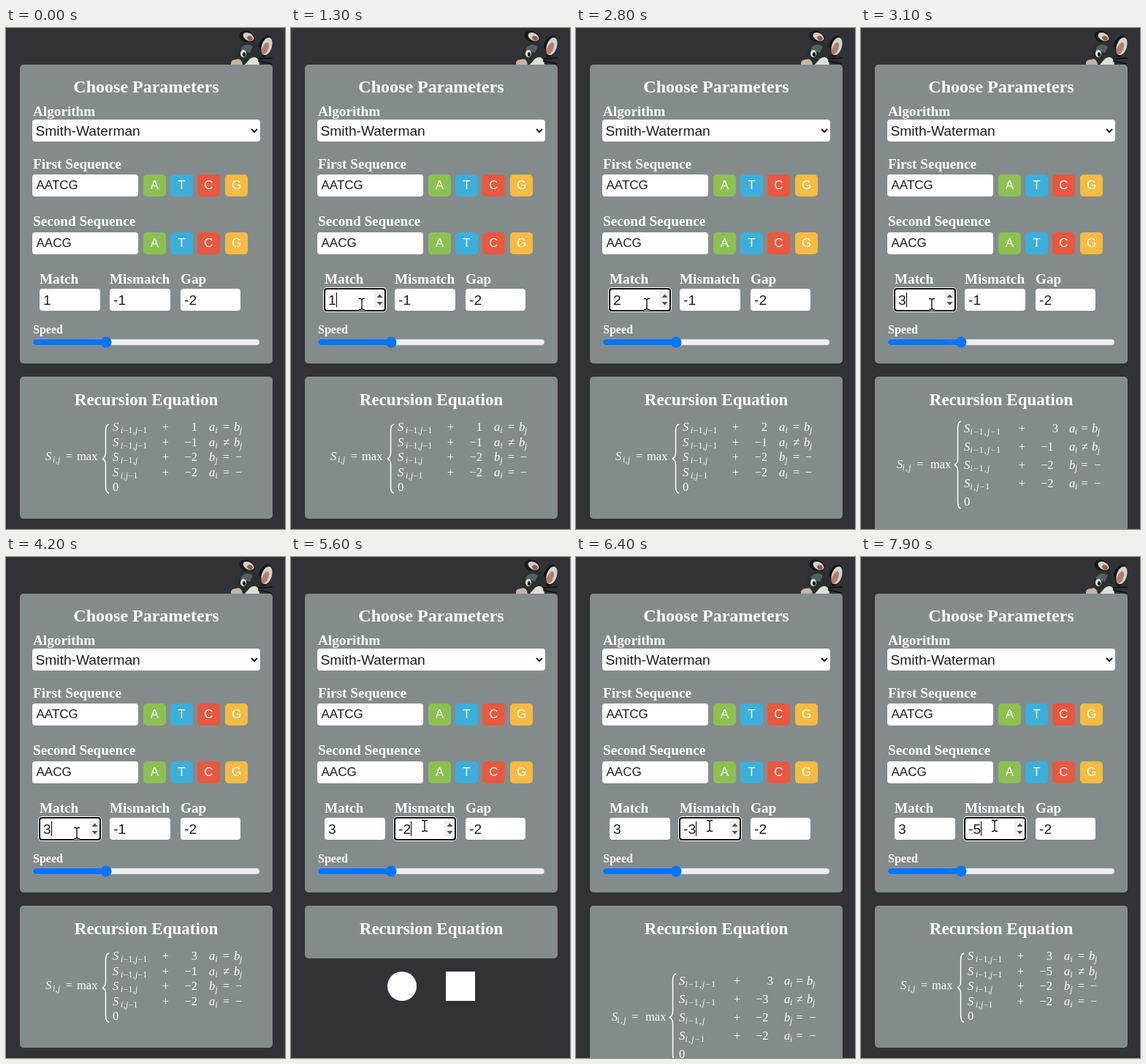
An HTML page that plays this animation: 382x684 px, repeating every 8000 ms.

```html
<!DOCTYPE html>
<html lang="en">
<head>
<meta charset="utf-8">
<title>Alignment parameters</title>
<style>
  html, body { margin: 0; width: 100%; height: 100%; overflow: hidden; background: #323136; }
  svg { display: block; width: 382px; height: 684px; }
  text { white-space: pre; }
  .label { font: bold 19.2px "Liberation Serif", serif; fill: #fff; }
  .title { font: bold 24px "Liberation Serif", serif; fill: #fff; text-anchor: middle; }
  .field { font: 19.2px "Liberation Sans", sans-serif; fill: #1c1c1c; }
  .seq { font-size: 17px; }
  .base { font: 17px "Liberation Sans", sans-serif; fill: #fff; text-anchor: middle; }
  .math { font: 16.5px "Liberation Serif", serif; fill: #fff; }
  .math .sub { font-size: 11.5px; }
  .math .mid { text-anchor: middle; }
  .math .end { text-anchor: end; }
  .math i, .it { font-style: italic; }
  .card { fill: #848b8d; }
  .box { fill: #fff; }
</style>
</head>
<body>
<svg viewBox="0 0 382 684">
  <g id="mouse">
    <ellipse cx="330" cy="12" rx="11" ry="8" fill="#17191a" transform="rotate(24 330 12)"/>
    <ellipse cx="332" cy="12" rx="8" ry="5" fill="#d8cfc6" transform="rotate(28 332 12)"/>
    <ellipse cx="334" cy="14" rx="4" ry="3" fill="#8f5d55" transform="rotate(28 334 14)"/>
    <ellipse cx="355" cy="25" rx="9" ry="15" fill="#111415" transform="rotate(18 355 25)"/>
    <ellipse cx="357" cy="25" rx="7" ry="12.5" fill="#cfd3cf" transform="rotate(18 357 25)"/>
    <ellipse cx="355" cy="28" rx="4" ry="9" fill="#b57a70" transform="rotate(24 355 28)"/>
    <path d="M316 36Q319 19 333 18Q346 20 350 35L347 50H316Z" fill="#29302f"/>
    <path d="M322 27Q329 19 338 25L334 34Q327 30 322 36Z" fill="#536061"/>
    <ellipse cx="325" cy="35" rx="4" ry="5" fill="#e3e6df"/>
    <ellipse cx="326" cy="36" rx="2" ry="3" fill="#080a0a"/>
    <path d="M334 42Q345 35 347 50H327Z" fill="#dce0d9"/>
    <path d="M308 50Q307 43 315 43Q322 40 324 50Z" fill="#c9b5a3"/>
    <path d="M345 42L365 41M345 45L364 49" stroke="#0c0e0e" stroke-width="1.5"/>
  </g>
  <rect class="card" x="19" y="50" width="346" height="408" rx="5"/>
  <text class="title" x="192" y="88">Choose Parameters</text>
  <text class="label" x="37" y="120">Algorithm</text>
  <rect class="box" x="36" y="125" width="312" height="30" rx="4"/>
  <text class="field" x="40.5" y="146.500">Smith-Waterman</text>
  <path d="M336 138l4 4 4-4" fill="none" stroke="#1c1c1c" stroke-width="2"/>
  <g id="sequences"></g>
  <text class="label" x="46" y="349">Match</text>
  <text class="label" x="142" y="349">Mismatch</text>
  <text class="label" x="239" y="349">Gap</text>
  <g id="numbers"></g>
  <text class="label" x="37" y="417" style="font-size:16px">Speed</text>
  <rect id="track" x="37" y="425" width="310" height="8" rx="4" stroke="#b2b2b2" stroke-width=".5"/>
  <g id="level">
    <rect x="37" y="425" width="100" height="8" rx="4"/>
    <circle cx="137" cy="429" r="7.5"/>
  </g>
  <rect id="panel" class="card" x="19" y="476" width="346" rx="5"/>
  <text class="title" x="192" y="515" style="font-size:23.04px">Recursion Equation</text>
  <g id="formula" class="math"></g>
  <g id="links" fill="#fff">
    <circle cx="152" cy="586" r="20"/>
    <rect x="212" y="566" width="40" height="40"/>
  </g>
  <g id="cursor">
    <path id="arrow" d="M.5 .5V16.200L4 12.800L6.500 18.500L9.300 17.300L6.900 11.700H11.500Z" fill="#000" stroke="#fff"/>
    <g id="beam" fill="none" stroke-linejoin="round">
      <path d="M-4-7.500H-1.500L0-6L1.500-7.500H4M0-6V6M-4 7.500H-1.500L0 6L1.500 7.500H4" stroke="#fff" stroke-width="3.200"/>
      <path d="M-4-7.500H-1.500L0-6L1.500-7.500H4M0-6V6M-4 7.500H-1.500L0 6L1.500 7.500H4" stroke="#000" stroke-width="1.300"/>
    </g>
  </g>
</svg>
<script>
const $ = id => document.getElementById(id);
const LOOP = 8000, TICK = 100;

// All times below are in ticks of 100 ms.
const edits = [
  { at: 22, match: 2, steps: 4 },
  { at: 30, match: 3, steps: 4 },
  { at: 56, mismatch: -2, steps: 4 },
  { at: 62, mismatch: -3, steps: 4 },
  { at: 71, mismatch: -4, steps: 3 },
  { at: 77, mismatch: -5, steps: 3 }
];
const caretOn = [[13, 18], [22, 28], [30, 36], [42, 47], [49, 55], [56, 69], [71, 80]];
const moves = [
  { from: 3, to: 10, a: [360, 463], b: [97, 377] },
  { from: 42, to: 48, a: [97, 377], b: [183, 367] }
];
const inputs = [
  { name: 'match', x: 46, w: 83 },
  { name: 'mismatch', x: 142, w: 83 },
  { name: 'gap', x: 239, w: 82 }
];

// Two looks of the equation: quick preview and final typesetting.
const finalLook = {
  y: 550, step: 20.6, s: 146, sub: 11, gap: .4, plus: 218.5, num: [262, 262],
  cond: 278, condSub: 8.5, eq: 301.5, rhs: 312, dash: 318.5,
  lhs: 54, lhsEq: 86.5, max: 97, brace: [132, 541, 635]
};
const previewLook = {
  y: 584, step: 25, s: 141, sub: 8.5, gap: 1.3, plus: 220.5, num: [270, 263.5],
  cond: 285, condSub: 8, eq: 306, rhs: 316, dash: 324,
  lhs: 49, lhsEq: 81, max: 95, brace: [128, 569, 688]
};

const italic = s => s.replace(/[a-z]/gi, '<tspan class="it">$&</tspan>');
const text = (cls, x, y, s, extra = '') => `<text class="${cls}" x="${x}" y="${y}" ${extra}>${s}</text>`;
const rect = (x, y, w, h, attrs) => `<rect x="${x}" y="${y}" width="${w}" height="${h}" ${attrs}/>`;

function symbol(x, y, s, sub, offset, gap) {
  return text('', x, y, italic(s)) +
    text('sub', x + offset, y + 3, italic(sub), `letter-spacing="${gap}"`);
}

function brace([x, top, bottom]) {
  const mid = (top + bottom) / 2, stem = x + 4.5, tip = x + 9;
  const half = (end, d) => `M${tip} ${end}Q${stem} ${end + d} ${stem} ${end + 9 * d}V${mid - 8 * d}Q${stem} ${mid - 2 * d} ${x} ${mid}`;
  return `<path d="${half(top, 1)}${half(bottom, -1)}" fill="none" stroke="#fff" stroke-width="1.5"/>`;
}

function equation(k, v) {
  const minus = n => String(n).replace('-', '−');
  const rows = [
    ['i−1,j−1', v.match, 'a', 'i', '='],
    ['i−1,j−1', v.mismatch, 'a', 'i', '≠'],
    ['i−1,j', v.gap, 'b', 'j', '='],
    ['i,j−1', v.gap, 'a', 'i', '=']
  ];
  const mid = k.y + 2 * k.step - 1;
  let out = symbol(k.lhs, mid, 'S', 'i,j', k.sub - 1, k.gap) +
    text('mid', k.lhsEq, mid, '=') + text('', k.max, mid, 'max') + brace(k.brace);
  rows.forEach(([sub, n, c, cs, eq], r) => {
    const y = k.y + r * k.step;
    out += symbol(k.s, y, 'S', sub, k.sub, k.gap) + text('mid', k.plus, y, '+') +
      text('end', k.num[r ? 1 : 0], y, minus(n)) +
      symbol(k.cond, y, c, cs, k.condSub, 0) + text('mid', k.eq, y, eq) +
      (r < 2 ? symbol(k.rhs, y, 'b', 'j', 8, 0) : text('mid', k.dash, y, '−'));
  });
  return out + text('', k.s, k.y + 4 * k.step, '0');
}

function numberInput({ name, x, w }, value, s) {
  const focused = s.focus === name, active = focused || s.hover === name;
  let out = '';
  if (focused) out += rect(x - 2, 354, w + 4, 34, 'rx="5" fill="#fff"') + rect(x - 1, 355, w + 2, 32, 'rx="4" fill="#101010"');
  out += focused ? rect(x + 1, 357, w - 2, 28, 'rx="3" fill="#fff"') : rect(x, 356, w, 30, 'rx="4" fill="#fff"');
  out += text('field', x + 5, 377.5, value);
  if (active) {
    const c = x + w - 7.5;
    out += rect(c - 7.5, 360, 14, 22, 'fill="#efefef"') +
      `<path d="M${c - 4} 368l4-4.500 4 4.500zM${c - 4} 374l4 4.500 4-4.500z" fill="#505050"/>`;
  }
  if (focused && s.caret) out += rect(x + 5 + (value < 0 ? 17 : 11), 361, 1, 20, 'fill="#000"');
  return out;
}

function cursorAt(tick) {
  if (tick < moves[0].from) return null;
  const m = moves.filter(m => tick >= m.from).pop();
  const p = Math.min(1, (tick - m.from) / (m.to - m.from));
  const e = p * p * (3 - 2 * p);
  return m.a.map((a, i) => a + (m.b[i] - a) * e);
}

function drawSequences() {
  const bases = { A: '#8cc152', T: '#3bafda', C: '#e9573f', G: '#f6bb42' };
  $('sequences').innerHTML = [['First', 'AATCG', 200], ['Second', 'AACG', 279]].map(([name, seq, y]) =>
    text('label', 37, y - (y === 200 ? 8 : 9), name + ' Sequence') +
    rect(36, y, 145, 30, 'rx="4" fill="#fff"') + text('field seq', 41.5, y + 20, seq) +
    Object.entries(bases).map(([b, color], i) => {
      const x = 188 + Math.round(i * 37.2);
      return rect(x, y, 31, 30, `rx="5" fill="${color}"`) + text('base', x + 15.5, y + 20, b);
    }).join('')).join('');
}

function draw(tick) {
  const values = { match: 1, mismatch: -1, gap: -2 };
  const done = edits.filter(e => tick >= e.at);
  done.forEach(e => Object.assign(values, e));
  const last = done[done.length - 1];
  const left = last ? last.at + last.steps - 1 - tick : 0;
  const empty = last && tick === last.at;

  const pos = cursorAt(tick);
  const over = (x, y, w, h) => pos && pos[0] >= x && pos[0] <= x + w && pos[1] >= y && pos[1] <= y + h;
  const hovered = inputs.find(f => over(f.x, 356, f.w, 30));
  const state = {
    focus: tick >= 49 ? 'mismatch' : tick >= 13 ? 'match' : '',
    hover: hovered && hovered.name,
    caret: caretOn.some(([a, b]) => tick >= a && tick < b)
  };
  $('numbers').innerHTML = inputs.map(f => numberInput(f, values[f.name], state)).join('');

  const slide = over(37, 421, 310, 16);
  $('track').setAttribute('fill', slide ? '#e5e5e5' : '#efefef');
  $('level').setAttribute('fill', slide ? '#005cc8' : '#0075ff');

  const preview = !empty && left > 0;
  const shift = preview && left === 2 ? -32 : 0;
  $('panel').setAttribute('height', empty ? 72 : preview ? 244 + shift : 194);
  $('formula').innerHTML = empty ? '' : equation(preview ? previewLook : finalLook, values);
  $('formula').setAttribute('transform', `translate(0 ${shift})`);
  $('links').style.display = empty ? '' : 'none';

  $('cursor').style.display = pos ? '' : 'none';
  if (pos) {
    $('cursor').setAttribute('transform', `translate(${pos.map(Math.round).join(' ')})`);
    $('beam').style.display = hovered ? '' : 'none';
    $('arrow').style.display = hovered ? 'none' : '';
  }
}

let shown = -1;
const start = performance.now();
function frame() {
  const tick = Math.floor((performance.now() - start) % LOOP / TICK);
  if (tick !== shown) draw(shown = tick);
  requestAnimationFrame(frame);
}
drawSequences();
frame();
</script>
</body>
</html>
```
